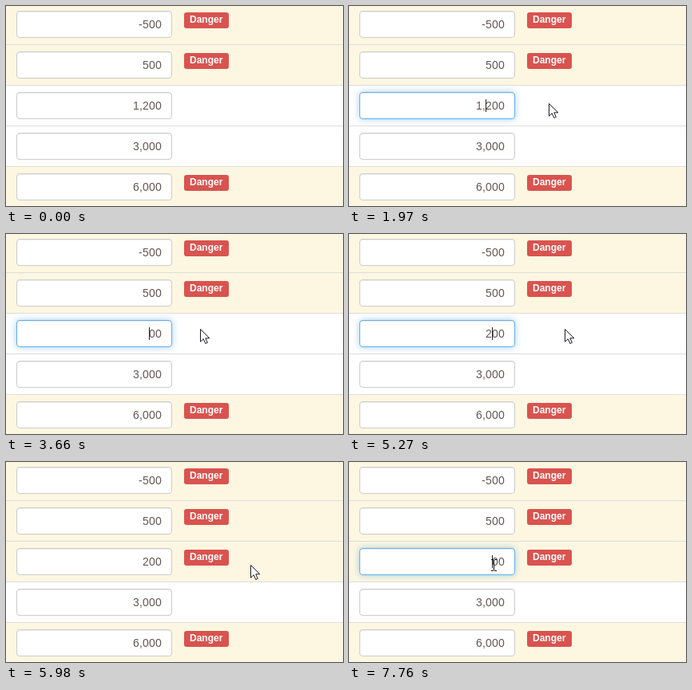
Write an HTML page that moves like this. It is 422x251 px and loops after 8000 ms.

```html
<!DOCTYPE html>
<html lang="en">
<head>
<meta charset="utf-8">
<title>Conditional row highlight</title>
<style>
  html, body { margin: 0; width: 100%; height: 100%; overflow: hidden; background: #fff; }
  body { position: relative; font: 14px/20px "Liberation Sans", Arial, sans-serif; }
  #rows { position: absolute; top: -2px; left: 0; width: 422px; }
  .row { position: relative; height: 50px; border-bottom: 1px solid #ddd; }
  .row.danger { background: #fdf7e1; }
  .field {
    position: absolute; left: 13px; top: 8px; width: 195px; height: 34px;
    box-sizing: border-box; padding: 6px 12px; border: 1px solid #ccc; border-radius: 4px;
    background: #fff; color: #655555; text-align: right; letter-spacing: .214px;
    box-shadow: inset 0 1px 1px rgba(0, 0, 0, .075);
  }
  .label {
    display: none; position: absolute; left: 223px; top: 10px; width: 49px; height: 20px;
    padding-left: 7px; border-radius: 3px; background: #d9534f; color: #fff;
    font: bold 12px/18px "Liberation Sans", Arial, sans-serif;
  }
  .danger .label { display: block; }
  #caret { position: absolute; top: 117px; width: 1px; height: 16px; background: #222; }
  #pointer { position: absolute; left: 0; top: 0; overflow: visible; }
  #arrow { fill: #fff; stroke: #1c1c28; }
  #beam { fill: none; stroke: #111; }
</style>
</head>
<body>
<div id="rows"></div>
<div id="caret"></div>
<svg id="pointer" width="14" height="20">
  <path id="arrow" d="M.5 .5V16.2L4.2 12.7 6.8 18.5 9.3 17.4 6.8 11.8H11.8Z"/>
  <path id="beam" d="M0 .5H3M4 .5H7M3.5 1V14M0 14.5H3M4 14.5H7"/>
</svg>
<script>
const DURATION = 8000;
const ARROW = 'arrow', BEAM = 'beam';

// Every track holds [time, ...values] until its next entry.
const pointerTrack = [
  [0], [1100, 311, 205, ARROW], [1180, 290, 183, ARROW], [1260, 255, 155, ARROW],
  [1330, 222, 136, ARROW], [1410, 192, 117, BEAM], [1490, 180, 113, BEAM],
  [1800, 199, 113, BEAM], [1880, 232, 121, ARROW], [1970, 250, 122, ARROW],
  [2040, 256, 122, ARROW], [2110, 250, 120, ARROW], [2190, 243, 119, ARROW],
  [5120, 250, 119, ARROW], [5190, 261, 119, ARROW], [5270, 270, 119, ARROW],
  [5430, 269, 113, BEAM, '#4a9c3c'], [5500, 282, 122, ARROW], [5580, 292, 125, ARROW],
  [5660, 299, 127, ARROW], [5740, 304, 128, ARROW], [5900, 307, 129, ARROW],
  [5980, 306, 129, ARROW], [6050, 284, 133, ARROW], [6120, 240, 132, ARROW],
  [6200, 196, 124, BEAM], [6280, 192, 123, BEAM], [6360, 187, 123, BEAM],
  [6440, 182, 124, BEAM], [6520, 178, 123, BEAM], [7230, 178, 122, BEAM],
];
// Text, then the number of digits to the right of the caret (none when hidden).
const textTrack = [
  [0, '1,200'], [1640, '1,200', 3], [2340, '1,200'], [2880, '1,200', 2],
  [3260, '1,00', 2], [3500, '100', 2], [3660, '00', 2], [4200, '00'],
  [4280, '200', 2], [4740, '200'], [5270, '200', 2], [5430, '200'],
  [6980, '200', 2], [7610, '200'], [7760, '00', 2],
];
const focusTrack = [
  [0, 0], [1640, .2], [1720, .8], [1800, 1], [5430, .75], [5500, .25], [5580, 0],
  [6980, .5], [7060, 1],
];
const at = (track, t) => track.findLast(key => key[0] <= t).slice(1);
const $ = id => document.getElementById(id);

$('rows').innerHTML = ['-500', '500', '1,200', '3,000', '6,000'].map((value, i) =>
  `<div class="row${i === 2 || i === 3 ? '' : ' danger'}">
    <div class="field">${value}</div><div class="label">Danger</div></div>`).join('');
const row = $('rows').children[2];
const field = row.firstElementChild;

function render(t) {
  const [text, digitsRight] = at(textTrack, t);
  field.textContent = text;
  $('caret').hidden = digitsRight === undefined;
  $('caret').style.left = 195 - 8 * (digitsRight || 0) + 'px';
  row.classList.toggle('danger', t >= 5430);

  const [focus] = at(focusTrack, t);
  const mix = (from, to) => from + (to - from) * focus;
  field.style.borderColor = `rgb(${mix(204, 102)}, ${mix(204, 175)}, ${mix(204, 233)})`;
  field.style.boxShadow = `inset 0 1px 1px rgba(0, 0, 0, .075),
    0 0 ${8 * focus}px rgba(102, 175, 233, ${.6 * focus})`;

  const [x = 0, y = 0, shape, color = '#111'] = at(pointerTrack, t);
  $('pointer').style.transform = `translate(${x}px, ${y}px)`;
  for (const id of [ARROW, BEAM]) $(id).style.display = id === shape ? '' : 'none';
  $('beam').style.stroke = color;
}

const start = performance.now();
function tick() {
  render((performance.now() - start) % DURATION);
  requestAnimationFrame(tick);
}
tick();
</script>
</body>
</html>
```
